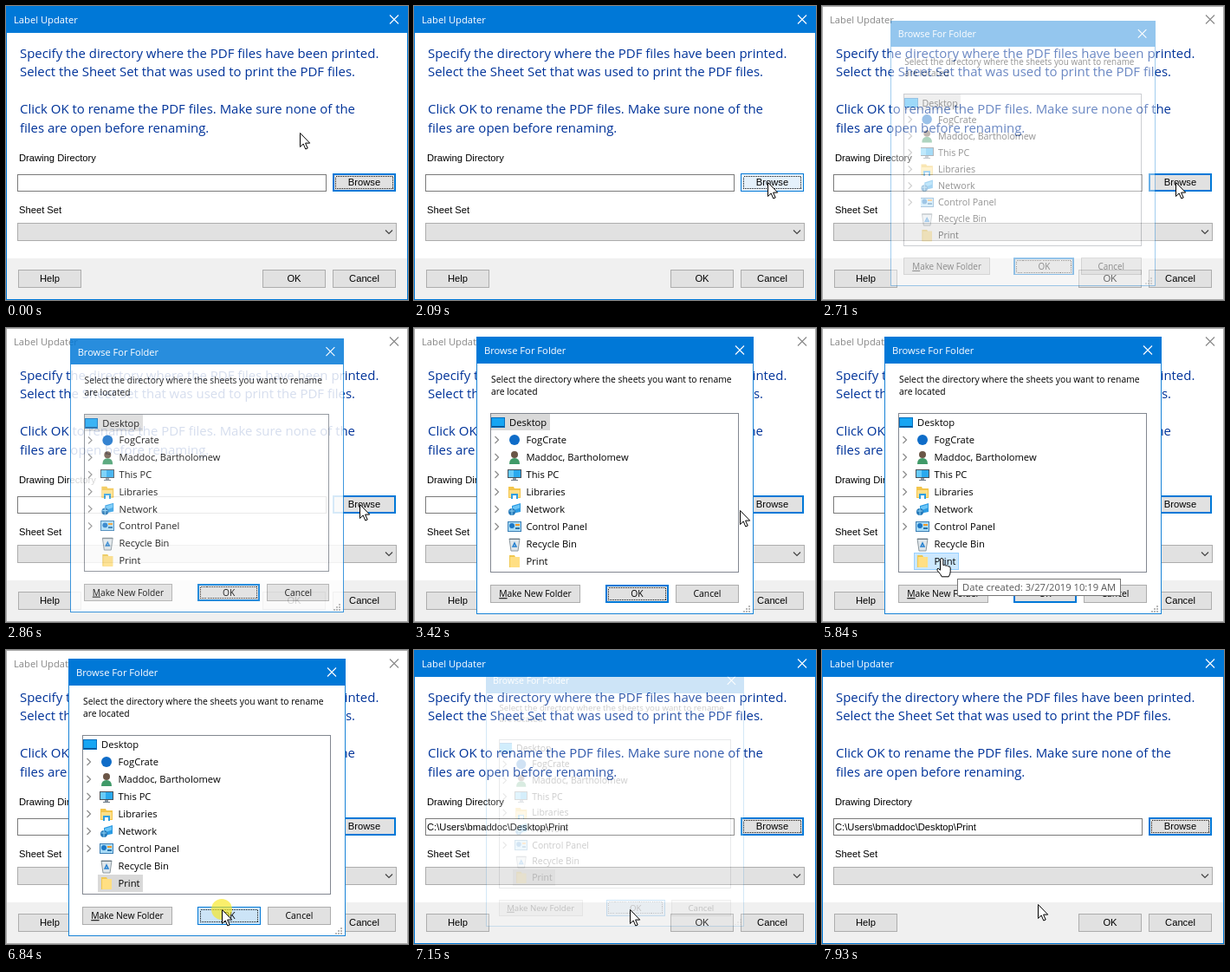
These frames come from a looping animation (464x339 px, 8000 ms). An HTML page:

```html
<!DOCTYPE html>
<html lang="en">
<head>
<meta charset="utf-8">
<title>Browse for a folder</title>
<style>
  html, body { margin: 0; width: 100%; height: 100%; overflow: hidden; background: #fff; }
  svg { display: block; width: 464px; height: 339px; }
  text { white-space: pre; }
  rect { shape-rendering: crispEdges; }
  .ui { font-family: "Open Sans", sans-serif; font-size: 11.2px; }
  .head { font-size: 14.95px; fill: #039; }
  .small { font-size: 10.35px; }
  .form { font-family: "Liberation Sans", Arial, sans-serif; font-size: 11.2px; }
  .mid { text-anchor: middle; }
</style>
</head>
<body>
<svg id="stage" viewBox="0 0 464 339"></svg>
<script>
const LOOP = 8000, BLUE = '#0078d7';

// Markup helpers
const rect = (x, y, w, h, fill, extra = '') =>
  `<rect x="${x}" y="${y}" width="${w}" height="${h}" fill="${fill}" ${extra}/>`;
const box = (x, y, w, h, fill, stroke, extra = '') =>
  rect(x + .5, y + .5, w - 1, h - 1, fill, `stroke="${stroke}" ${extra}`);
const line = (d, stroke, width = 1) =>
  `<path d="${d}" fill="none" stroke="${stroke}" stroke-width="${width}"/>`;
const shape = (d, fill, extra = '') => `<path d="${d}" fill="${fill}" ${extra}/>`;
const text = (x, y, s, cls = 'ui', extra = '') =>
  `<text x="${x}" y="${y}" class="${cls}" ${extra}>${s}</text>`;
const button = (x, y, w, h, label, cls, id = '') =>
  `<g id="${id}">${box(x, y, w, h, '#e1e1e1', '#adadad', 'class="face"')}` +
  box(x + 1, y + 1, w - 2, h - 2, 'none', BLUE, 'class="ring" visibility="hidden"') +
  box(x + 3, y + 3, w - 6, h - 6, 'none', '#111', 'class="focus" stroke-dasharray="1" visibility="hidden"') +
  text(x + w / 2, y + h / 2 + 3.7, label, cls + ' mid') + '</g>';
const cross = (x, y, id) =>
  `<path id="${id}" d="M${x - 5},${y - 5}l10,10m0,-10l-10,10" fill="none" stroke="#fff" stroke-width="1.1"/>`;

// 16 x 16 tree icons
const monitor = rect(0, 2, 16, 10, '#49515a') + rect(1, 3, 14, 8, '#2aa9ee') +
  rect(1, 3, 6, 8, '#67cbfa') + rect(6, 12, 4, 2, '#8a98a5') + rect(4, 14, 8, 1, '#6d7a86');
const folder = shape('M2,1h6l1,2h5v12h-12z', '#f0c850') + shape('M3,3h11v12h-11z', '#ffdf83');
const icons = {
  desktop: rect(0, 2, 16, 12, '#0a6fbd') + rect(1, 3, 14, 10, '#16a5f3') + rect(1, 12, 14, 1, '#0b4f8a'),
  cloud: '<circle cx="8" cy="8" r="6" fill="#0f6cc8"/>',
  user: '<circle cx="8" cy="5" r="4" fill="#6b5647"/>' + shape('M2,16q0,-7 6,-7t6,7z', '#3f9a68'),
  pc: monitor,
  library: shape('M1,2h6l1,2h7v11h-14z', '#f3c54b') + rect(2, 6, 12, 8, '#ffe08a') +
    rect(4, 10, 8, 6, '#2f9fe0') + rect(6, 12, 4, 4, '#fff'),
  network: shape('M5,4l10,-3v10l-10,2z', '#2b9be3') + shape('M6,5l8,-2.5v4l-8,3z', '#6cc6f7') +
    '<circle cx="5" cy="11" r="4" fill="#2478b8"/>' + line('M2,10h6m-3,-3v8', '#8fd3f5'),
  panel: rect(0, 2, 16, 12, '#3b7fb5') + rect(1, 3, 14, 10, '#a9dcf7') +
    '<circle cx="5" cy="7" r="3" fill="#1b77c5"/>' + rect(9, 5, 5, 2, '#f39a2b') + rect(9, 9, 5, 2, '#2874ad'),
  bin: shape('M2,2h12l-2,14h-8z', '#dfe6ea', 'stroke="#8b979f"') + line('M2,2.5h12', '#6d7a83') +
    line('M6,11l2,-4l2,4z', '#2580cf', 1.5),
  folder
};
const rows = [
  ['desktop', 'Desktop'], ['cloud', 'FogCrate'], ['user', 'Maddoc, Bartholomew'], ['pc', 'This PC'],
  ['library', 'Libraries'], ['network', 'Network'], ['panel', 'Control Panel'], ['bin', 'Recycle Bin'],
  ['folder', 'Print']
];
const tree = rows.map(([icon, label], i) => {
  const y = 109 + 20 * i;
  const chevron = i > 0 && i < 7 ? line(`M93.5,${y - 4}l4,4l-4,4`, '#8a8a8a', 1.2) : '';
  return `${chevron}<g transform="translate(${i ? 108 : 89},${y - 8})">${icons[icon]}</g>` +
    text(i ? 129.5 : 110, y + 4, label);
}).join('');

const mainWindow =
  box(0, 0, 464, 339, '#fff', BLUE, 'id="frame"') +
  rect(1, 291, 462, 47, '#f0f0f0') + rect(0, 0, 464, 31, BLUE, 'id="bar"') +
  text(9, 20, 'Label Updater', 'ui', 'id="caption"') + cross(448, 15.5, 'close') +
  ['Specify the directory where the PDF files have been printed.',
   'Select the Sheet Set that was used to print the PDF files.', '',
   'Click OK to rename the PDF files. Make sure none of the',
   'files are open before renaming.'].map((s, i) => text(16, 60 + 21.4 * i, s, 'ui head')).join('') +
  text(15, 179, 'Drawing Directory', 'form') + box(13, 194, 357, 20, '#fff', '#7a7a7a') +
  text(15, 208, 'C:\\Users\\bmaddoc\\Desktop\\Print', 'form', 'id="path"') +
  button(377, 193, 73, 21, 'Browse', 'form', 'browse') +
  text(15, 239, 'Sheet Set', 'form') + box(13, 250, 438, 21, '#e1e1e1', '#adadad') +
  line('M438,258.5l4,4l4,-4', '#444', 1.2) +
  button(14, 304, 73, 21, 'Help', 'form') + button(296, 304, 73, 21, 'OK', 'form') +
  button(377, 304, 73, 21, 'Cancel', 'form');

let grip = '';
for (let i = 0; i < 3; i++)
  for (let j = 0; j <= i; j++) grip += rect(386 - 3 * j, 320 + 3 * i, 2, 2, '#b8b8b8');

const dialog = '<g id="dialog">' +
  box(72, 10, 320, 320, '#fff', '#1883d7') + rect(72, 10, 320, 31, BLUE) +
  text(81, 30, 'Browse For Folder', 'ui', 'fill="#fff"') + cross(376, 25.5, 'dialogClose') +
  text(89, 63, 'Select the directory where the sheets you want to rename', 'ui small') +
  text(89, 76.5, 'are located', 'ui small') + box(88, 98, 287, 184, '#fff', '#828790') +
  rect(89, 99, 68, 19, '#d9d9d9', 'id="desktopRow"') +
  box(106, 259, 52, 20, '#fff', '#fff', 'id="printRow"') + tree +
  button(88, 296, 104, 21, '<tspan text-decoration="underline">M</tspan>ake New Folder', 'ui small') +
  button(221, 296, 73, 21, 'OK', 'ui small', 'ok') +
  button(302, 296, 73, 21, 'Cancel', 'ui small') + grip + '</g>';

const tooltip = '<g id="tip">' + box(156, 289, 189, 20, '#fff', '#767676') +
  text(162, 303, 'Date created: 3/27/2019 10:19 AM', 'ui', 'fill="#575757"') + '</g>';

const outline = 'stroke="#000" stroke-linejoin="round"';
const pointer = '<g id="pointer"><circle id="click" r="12" fill="#f8e71c" fill-opacity=".65"/>' +
  shape('M.5,.5v16l3.7,-3.5l2.6,6l2.4,-1l-2.6,-5.9h5.1z', '#fff', outline + ' id="arrow"') +
  shape('M-1.5,.5q0,-2 1.7,-2t1.7,2v6q1.5,-1 3,.6q1.6,-.8 2.7,.7q2.6,-.3 2.6,2v4q0,3 -2,6h-8' +
    'q-1,-3 -5,-7q-1,-2.5 1,-2.6l2.3,2z', '#fff', outline + ' id="hand"') + '</g>';

document.getElementById('stage').innerHTML = mainWindow + dialog + tooltip + pointer;

const el = id => document.getElementById(id);
const set = (node, attrs) => { for (const k in attrs) node.setAttribute(k, attrs[k]); };
const show = (node, on) => set(node, { visibility: on ? 'visible' : 'hidden' });
const paint = (id, fill, stroke, ring, focus) => {
  const part = name => el(id).querySelector('.' + name);
  set(part('face'), { fill, stroke });
  show(part('ring'), ring);
  show(part('focus'), focus);
};

// Progress in n equal jumps, the first at `from` and the last at `to`
const SLACK = 10;
const steps = (t, from, to, n) => {
  const k = Math.floor((t - from + SLACK) / ((to - from) / (n - 1))) + 1;
  return Math.max(0, Math.min(n, k)) / n;
};
const smooth = p => p * p * (3 - 2 * p);
const moves = [
  [1080, 1850, 11, 391, 200, smooth],
  [1940, 2090, 3, 408, 203, p => p * (2 - p)],
  [3330, 4210, 12, 135, 266, p => p ** 1.2],
  [5840, 6610, 11, 249, 299, smooth],
  [7840, 7930, 2, 249, 293, p => p]
];
function pointerAt(t) {
  let x = 339, y = 146;
  for (const [from, to, n, endX, endY, ease] of moves) {
    const p = ease(steps(t, from, to, n));
    x += (endX - x) * p;
    y += (endY - y) * p;
  }
  return [Math.round(x), Math.round(y)];
}

function draw(t) {
  const between = (a, b) => t >= a && t < b;
  const [x, y] = pointerAt(t);

  const active = !between(2630, 7070);
  set(el('bar'), active ? { x: 0, y: 0, width: 464, height: 31, fill: BLUE }
    : { x: 1, y: 1, width: 462, height: 30, fill: '#fff' });
  set(el('frame'), { stroke: active ? BLUE : '#aaa' });
  set(el('caption'), { fill: active ? '#fff' : '#888' });
  set(el('close'), { stroke: active ? '#fff' : '#888' });
  show(el('path'), t >= 7150);

  const overBrowse = t < 2630 && x >= 377 && y >= 193;
  if (overBrowse) paint('browse', t >= 2550 ? '#cce4f7' : '#e5f1fb', BLUE, false, true);
  else paint('browse', '#e1e1e1', BLUE, true, active);

  // The dialog grows while fading in and shrinks while fading out
  const opened = 1 - (1 - steps(t, 2630, 3030, 6)) ** 2;
  const visible = opened * (1 - steps(t, 7070, 7230, 3));
  set(el('dialog'), {
    opacity: visible ** 1.5,
    transform: `translate(232 169.5) scale(${.9 + .1 * visible}) translate(-232 -169.5)`
  });

  const onPrint = t >= 4200 && x < 158 && y < 278;
  const [rowFill, rowEdge] = t >= 6840 ? ['#d9d9d9', '#d9d9d9']
    : t >= 5310 ? ['#cce8ff', onPrint ? '#99d1ff' : '#cce8ff']
    : onPrint ? ['#e5f3ff', '#e5f3ff'] : ['#fff', '#fff'];
  set(el('printRow'), { fill: rowFill, stroke: rowEdge });
  set(el('desktopRow'), { opacity: t < 5310 ? 1 : 0 });

  const overOk = t >= 5840 && x >= 221 && y >= 296;
  if (t >= 6840) paint('ok', '#cce4f7', BLUE, false, true);
  else if (overOk) paint('ok', '#e5f1fb', BLUE, false, false);
  else paint('ok', '#e1e1e1', BLUE, true, t < 5310);

  set(el('tip'), { opacity: onPrint ? steps(t, 4210, 4360, 3) : 0 });
  set(el('pointer'), { transform: `translate(${x} ${y})` });
  show(el('click'), between(2550, 2710) || between(5140, 5310) || between(6840, 7070));
  show(el('hand'), onPrint);
  show(el('arrow'), !onPrint);
}

const start = performance.now();
function frame() {
  draw((performance.now() - start) % LOOP);
  requestAnimationFrame(frame);
}
draw(0);
requestAnimationFrame(frame);
</script>
</body>
</html>
```
